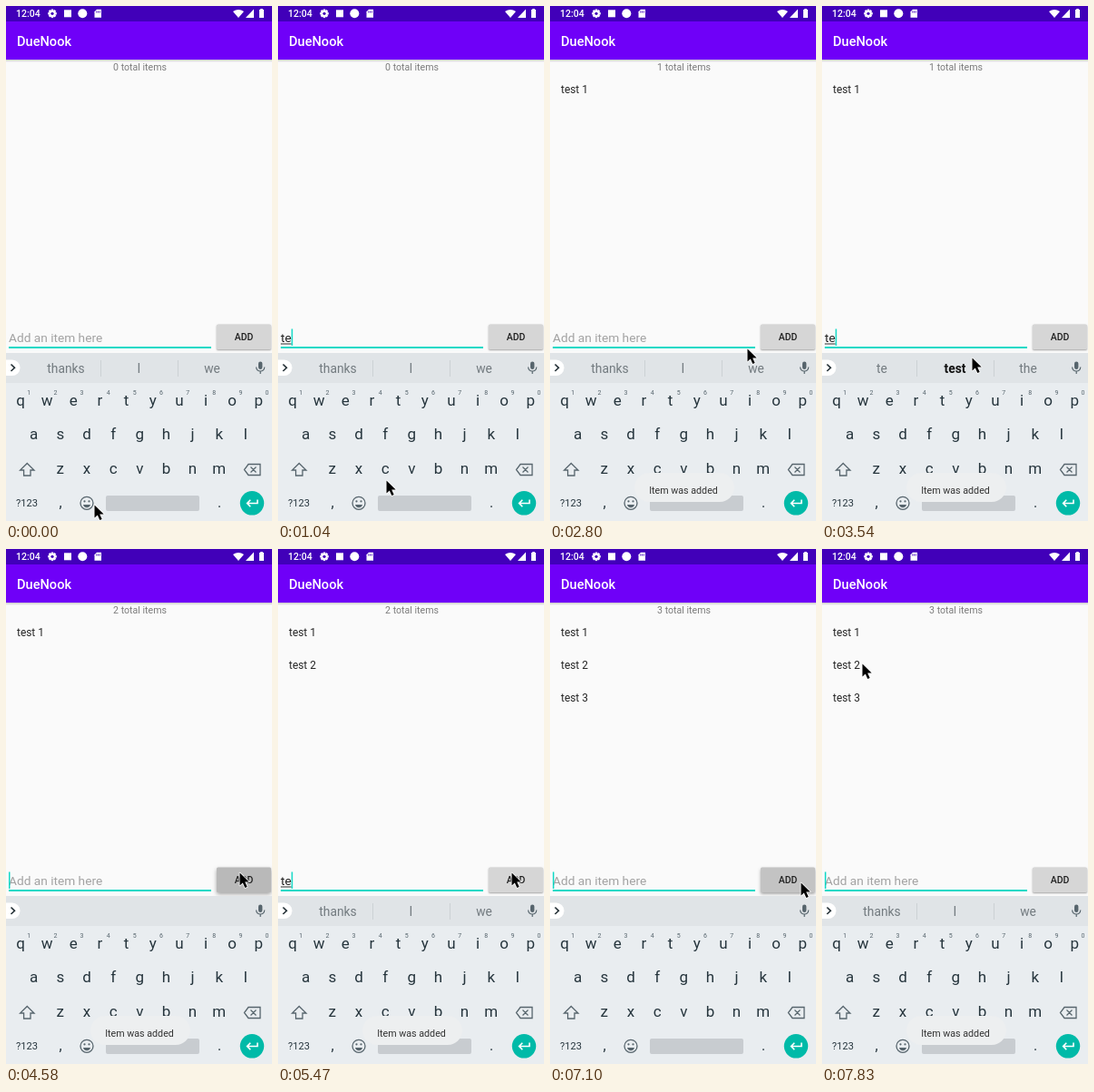
Animation of 293x567 px, one loop 8000 ms. Source, as an HTML page with a canvas:

```html
<!DOCTYPE html>
<html lang="en">
<head>
<meta charset="utf-8">
<title>DueNook</title>
<style>
html, body { margin: 0; width: 293px; height: 567px; overflow: hidden; background: #fafafa; }
canvas { display: block; }
</style>
</head>
<body>
<canvas id="stage" width="293" height="567"></canvas>
<script>
const c = document.getElementById('stage').getContext('2d');
const LOOP = 8000, TICK = 147.5;

// Every track is a list of [tick, value]; a value holds until the next entry.
const typed = [[4, ''],
  [7, 'te'], [8, 'tes'], [9, 'test'], [10, 'test '], [11, 'test 1'], [16, ''],
  [23, 't'], [24, 'te'], [25, 'tes'], [26, 'test'], [27, 'test '], [28, 'test 2'], [31, ''],
  [37, 'te'], [38, 'tes'], [40, 'test'], [41, 'test '], [42, 'test 3'], [47, '']];
const START = ['thanks', 'I', 'we'], MATCH = ['te', 'test', 'the'];
const hints = [[0, START], [8, MATCH], [10, []], [19, START], [24, MATCH], [27, []],
  [34, START], [38, MATCH], [41, []], [49, START]];
const toast = [[0, 0], [17, .5], [18, 1], [32, .4], [33, 0], [34, .6], [35, 1],
  [47, .4], [48, 0], [49, .6], [50, 1]];
const adds = [16, 31, 47];
const mouse = [[0, 97, 549], [2, 119, 522], [10, 119, 522], [14, 267, 367], [15, 269, 367],
  [17, 269, 367], [21, 165, 387], [26, 165, 387], [30, 257, 356], [40, 257, 356],
  [44, 276, 367], [48, 276, 367], [51, 62, 116], [53, 44, 126]];

const last = (track, n) => track.reduce((a, k) => k[0] <= n ? k : a, track[0]);

function mouseAt(n) {
  for (let i = 1; i < mouse.length; i++) {
    const [n0, x0, y0] = mouse[i - 1], [n1, x1, y1] = mouse[i];
    if (n <= n1) {
      const p = (n - n0) / (n1 - n0), e = p * p * (3 - 2 * p);
      return [x0 + (x1 - x0) * e, y0 + (y1 - y0) * e];
    }
  }
  return mouse[mouse.length - 1].slice(1);
}

function text(s, x, y, size, color, align = 'left', weight = 400) {
  c.font = `${weight} ${size}px Roboto, sans-serif`;
  c.textAlign = align;
  c.fillStyle = color;
  c.fillText(s, x, y);
}
function rect(x, y, w, h, color) {
  c.fillStyle = color;
  c.fillRect(x, y, w, h);
}
function round(x, y, w, h, r, color) {
  c.beginPath();
  c.roundRect(x, y, w, h, r);
  c.fillStyle = color;
  c.fill();
}
function disc(x, y, r, color) {
  c.beginPath();
  c.arc(x, y, r, 0, 7);
  c.fillStyle = color;
  c.fill();
}
function trace(d) {
  return new Path2D(d);
}
function fill(d, color) {
  c.fillStyle = color;
  c.fill(trace(d));
}
function line(d, color, width) {
  c.strokeStyle = color;
  c.lineWidth = width;
  c.stroke(trace(d));
}

function statusBar() {
  rect(0, 0, 293, 17, '#4100b9');
  text('12:04', 11, 12, 10.5, '#fff', 'left', 500);
  c.save();
  c.translate(51, 8.3);
  for (let i = 0; i < 4; i++) {
    rect(-1.2, -4.8, 2.4, 9.6, '#fff');
    c.rotate(Math.PI / 4);
  }
  c.restore();
  disc(51, 8.3, 3.7, '#fff');
  disc(51, 8.3, 1.6, '#4100b9');
  rect(64, 4.3, 8, 8, '#fff');
  disc(84.3, 8.3, 5, '#fff');
  fill('M100 3.8H105V12.8H97.5V6.3Z', '#fff');
  for (let i = 0; i < 3; i++) rect(99.3 + i * 1.8, 5.5, .9, 2, '#4100b9');
  fill('M250 6Q256 1.8 262 6L256 13Z', '#fff');
  fill('M273 3.5V13H264Z', '#fff');
  rect(279, 4, 5, 9, '#fff');
  rect(280.2, 3, 2.6, 1, '#fff');
}

function appBar() {
  const g = c.createLinearGradient(0, 59, 0, 62);
  g.addColorStop(0, 'rgba(0,0,0,.2)');
  g.addColorStop(1, 'rgba(0,0,0,0)');
  rect(0, 59, 293, 3, g);
  rect(0, 17, 293, 42, '#6f00f8');
  text('DueNook', 12, 44, 14.6, '#fff', 'left', 500);
}

function button(press) {
  c.save();
  c.shadowColor = 'rgba(0,0,0,.35)';
  c.shadowBlur = 2 + press * 2;
  c.shadowOffsetY = 1 + press;
  const v = Math.round(214 - press * 29);
  round(232, 350.5, 60, 27.5, 1.5, `rgb(${v},${v},${v})`);
  c.restore();
  text('ADD', 262, 368, 10.5, '#202020', 'center', 500);
}

function field(n) {
  const [since, value] = last(typed, n);
  if (value) {
    text(value, 3, 370, 13.7, '#202020');
  } else {
    text('Add an item here', 3, 370, 13.7, '#a2a2a2');
  }
  const w = value ? c.measureText(value).width : 0;
  if (value && !value.includes(' ')) rect(3, 371.5, w, 1, '#303030');
  rect(3, 375, 223, 2, '#12d9c6');
  const age = n - since;
  if (age >= 0 && age % 6 < 3) rect(3 + w, 355.5, 1.5, 18.5, '#12d9c6');
}

function strip(words) {
  rect(0, 382, 293, 33, '#e0e4e7');
  round(-8, 389.5, 23.5, 17.5, 8.7, '#fff');
  line('M5.5 394.5L9.5 398.3L5.5 402', '#263238', 1.6);
  words.forEach((w, i) => {
    const bold = w === 'test';
    text(w, [66, 146.5, 227][i], 404, 13.8, bold ? '#111' : '#727a7f', 'center', bold ? 700 : 400);
  });
  if (words.length) {
    rect(104, 390, 1, 18, '#ccd1d4');
    rect(189, 390, 1, 18, '#ccd1d4');
  }
  round(278, 391.5, 4.4, 8.5, 2.2, '#57656d');
  line('M275.6 397.5Q276 402 280.2 402T284.8 397.5M280.2 402V405', '#57656d', 1.2);
}

function keyboard() {
  const ink = '#26353d', soft = '#57656d';
  rect(0, 415, 293, 152, '#e9edf0');
  [['qwertyuiop', 16, 440], ['asdfghjkl', 30.7, 477], ['zxcvbnm', 59.8, 515]].forEach(([keys, x, y], row) => {
    [...keys].forEach((k, i) => {
      const kx = x + i * 29.15;
      text(k, kx, y, 17, ink, 'center');
      if (!row) text((i + 1) % 10, kx + 9.2, 428, 7, soft, 'center');
    });
  });
  line('M23.3 503.5L31 511H27V517H19.6V511H15.6Z', soft, 1.3);
  line('M267 504.5H280V516.5H267L262.5 510.5ZM269.5 507.5L275.5 513.5M275.5 507.5L269.5 513.5', soft, 1.3);
  text('?123', 11, 551, 11.1, ink);
  text(',', 60, 552, 16, ink, 'center');
  text('.', 235, 552, 16, ink, 'center');
  c.beginPath();
  c.arc(89, 547.3, 7, 0, 7);
  c.strokeStyle = soft;
  c.lineWidth = 1.3;
  c.stroke();
  disc(86.5, 545.3, 1.1, soft);
  disc(91.5, 545.3, 1.1, soft);
  fill('M85 549H93Q92 552.3 89 552.3T85 549Z', soft);
  round(110, 539, 103, 17, 2, '#c8ccd0');
  disc(271, 547.3, 13.2, '#00baa8');
  line('M277 543.5V547.5H265.8M269.3 543.7L265.6 547.5L269.3 551.3', '#fff', 1.6);
}

function snack(alpha) {
  c.save();
  c.globalAlpha = alpha;
  round(93, 514, 110, 32, 16, '#edeff0');
  text('Item was added', 147, 537, 10.7, '#333', 'center');
  c.restore();
}

function pointer(x, y) {
  c.save();
  c.translate(Math.round(x), Math.round(y));
  const arrow = 'M.5 .5V14.5L3.8 11.4L6.3 17L8.7 16L6.2 10.5H10.7Z';
  c.lineJoin = 'round';
  line(arrow, '#fff', 1.6);
  fill(arrow, '#000');
  c.restore();
}

function draw(t) {
  const n = Math.floor((t + 5) / TICK);
  const total = adds.filter(a => a <= n).length;
  const rows = adds.filter(a => a < n).length;
  const since = total ? n - adds[total - 1] : 9;
  rect(0, 0, 293, 567, '#fafafa');
  statusBar();
  appBar();
  text(total + ' total items', 147.5, 71, 10.6, '#7c7c7c', 'center');
  for (let i = 0; i < rows; i++) text('test ' + (i + 1), 12, 96 + i * 36, 11.9, '#252525');
  button(Math.max(0, 1 - since * .35));
  field(n);
  strip(last(hints, n)[1]);
  keyboard();
  snack(last(toast, n)[1]);
  pointer(...mouseAt(n));
}

function loop(now) {
  draw(now % LOOP);
  requestAnimationFrame(loop);
}
draw(0);
requestAnimationFrame(loop);
</script>
</body>
</html>
```
